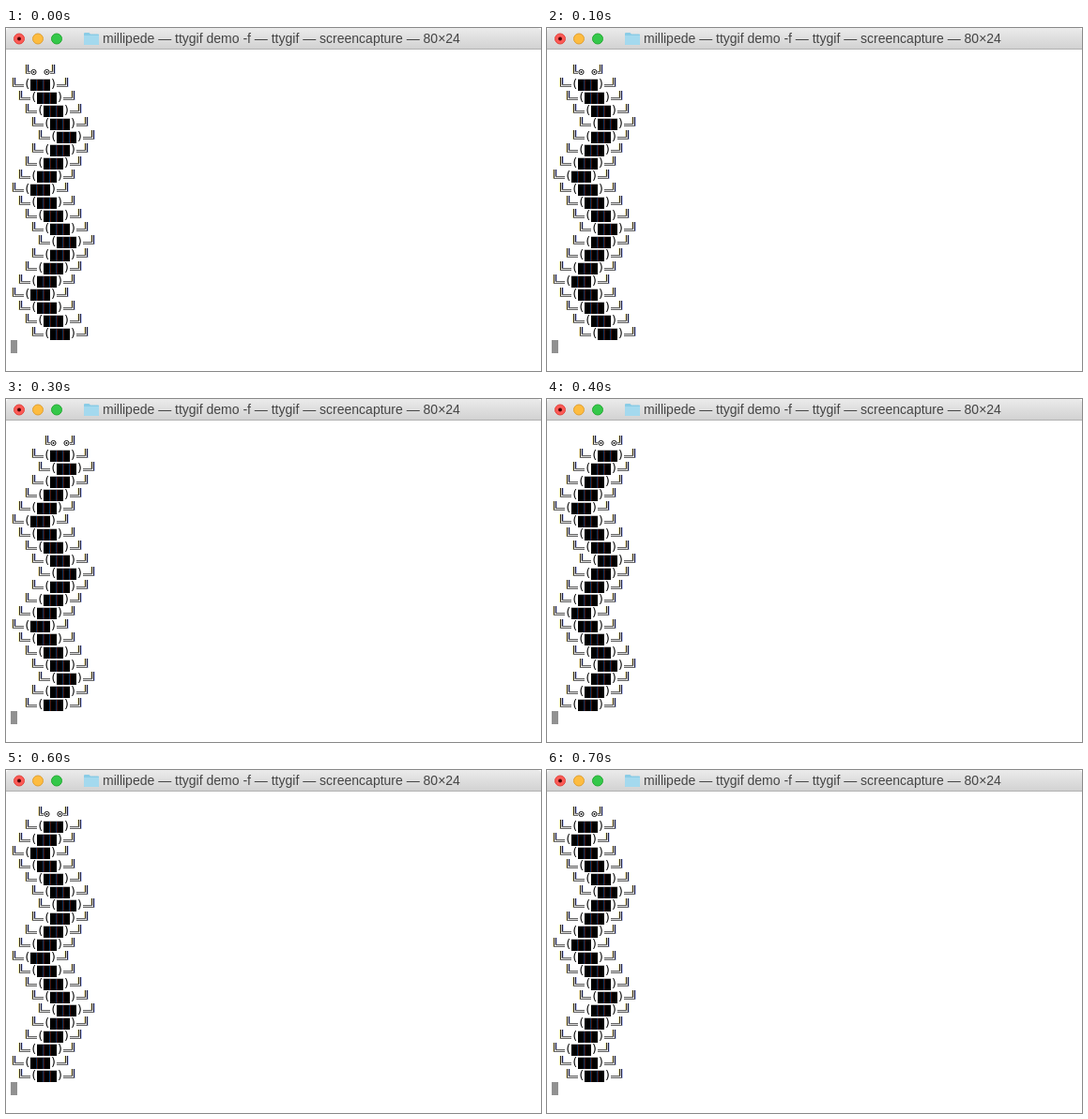
Animation of 570x366 px, one loop 0.8 s. Source, as an HTML page:

```html
<!DOCTYPE html>
<html lang="en">
<head>
<meta charset="utf-8">
<title>millipede</title>
<style>
  html, body { margin: 0; width: 100%; height: 100%; overflow: hidden; background: #fff; }
  svg { display: block; width: 570px; height: 366px; }
  rect { shape-rendering: crispEdges; }
  .title { font: 14px "Liberation Sans", Arial, sans-serif; fill: #444; }
  .mono { font: 12px "DejaVu Sans Mono", Menlo, monospace; }
  .row { animation: sway 800ms step-end infinite; }
  /* one 7px cell per step, four cells out and back */
  @keyframes sway {
    0%, 100% { transform: translateX(0); }
    12.5%, 87.5% { transform: translateX(7px); }
    25%, 75% { transform: translateX(14px); }
    37.5%, 62.5% { transform: translateX(21px); }
    50% { transform: translateX(28px); }
  }
</style>
</head>
<body>
<svg viewBox="0 0 570 366" xmlns="http://www.w3.org/2000/svg">
  <defs>
    <linearGradient id="bar" x2="0" y2="1">
      <stop offset="0" stop-color="#ebebeb"/>
      <stop offset="1" stop-color="#d2d2d2"/>
    </linearGradient>
  </defs>

  <path d="M0 22V4a4 4 0 0 1 4-4H566a4 4 0 0 1 4 4V22z" fill="url(#bar)"/>
  <rect y="22" width="570" height="1" fill="#b1b1b1"/>
  <g stroke-width="1">
    <circle cx="14" cy="11.5" r="5.5" fill="#fc5b57" stroke="#e2463f"/>
    <circle cx="34" cy="11.5" r="5.5" fill="#fdbc40" stroke="#dfa034"/>
    <circle cx="54" cy="11.5" r="5.5" fill="#34c84a" stroke="#27aa35"/>
  </g>
  <circle cx="14" cy="11.5" r="2" fill="#4a0505"/>
  <path d="M83 17V6q0-1 1-1h4.500l1.500 1.500h8q1 0 1 1V17q0 1-1 1H84q-1 0-1-1z" fill="#8accE6"/>
  <path d="M83 8h16v9q0 1-1 1H84q-1 0-1-1z" fill="#a4d9ee"/>
  <text class="title" x="103" y="16">millipede — ttygif demo -f — ttygif — screencapture — 80×24</text>

  <g id="body"></g>
  <rect x="5" y="333" width="7" height="14" fill="#919191"/>
</svg>
<script>
  const CELL = 7, LINE = 14, LEFT = 5, TOP = 39;

  const box = (x, y, w, h, fill) =>
    `<rect x="${x}" y="${y}" width="${w}" height="${h}" fill="${fill}"/>`;
  const glyph = (c, col) => `<text class="mono" x="${col * CELL}" y="11">${c}</text>`;

  // double bar from x0 to x1; the inner line may start or end elsewhere
  const bars = (x0, x1, in0 = x0, in1 = x1) =>
    box(in0, 7, in1 - in0, 1, '#666') + box(x0, 9, x1 - x0, 1, '#666') +
    box(in0, 8, in1 - in0, 1, '#d4d4d4');

  // upright pair of lines with tinted edges
  const posts = (x, leftH, rightH) =>
    box(x + 1, 0, 1, leftH, '#fff0b8') +
    box(x + 2, 0, 1, leftH, '#3a3220') +
    box(x + 3, 0, 1, 8, '#cfd0d0') +
    box(x + 4, 0, 1, rightH, '#20203f') +
    box(x + 5, 0, 1, rightH, '#c4d0ff');

  const leftFoot = (col, len) => {
    const x = col * CELL;
    return posts(x, 10, 7) + bars(x + 2, x + len * CELL, x + 4);
  };
  const rightFoot = (col, len) => {
    const x = col * CELL, start = x - (len - 1) * CELL;
    return posts(x, 7, 10) + bars(start, x + 5, start, x + 3);
  };

  const eye = col => {
    const x = col * CELL + 3.5;
    return `<circle cx="${x}" cy="8" r="2.600" fill="none" stroke="#111"/>` +
           `<circle cx="${x}" cy="8" r=".9"/>`;
  };
  const seam = x => box(x - 1, 2, 1, 12, '#00305c') + box(x, 2, 1, 12, '#481200');

  const head = leftFoot(2, 1) + eye(3) + eye(5) + rightFoot(6, 1);
  const segment = leftFoot(0, 2) + glyph('(', 2) +
    box(21, 1, 21, 1, '#bbb') + box(21, 2, 21, 12, '#000') + seam(28) + seam(35) +
    glyph(')', 6) + rightFoot(8, 2);

  const row = (art, line, phase) =>
    `<g transform="translate(${LEFT} ${TOP + line * LINE})">` +
    `<g class="row" style="animation-delay:${-phase * 100}ms">${art}</g></g>`;

  let out = row(head, 0, 0);
  for (let i = 0; i < 20; i++) out += row(segment, i + 1, i % 8);
  document.getElementById('body').innerHTML = out;
</script>
</body>
</html>
```
